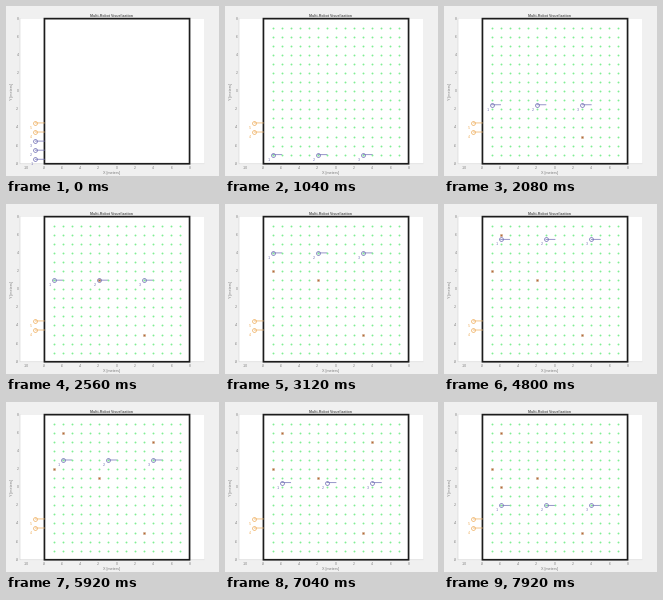
These frames come from a looping animation (213 px wide and 170 px high, 8000 ms). A matplotlib script:

```python
import matplotlib.pyplot as plt
import numpy as np
from matplotlib.animation import FuncAnimation
from matplotlib.patches import Rectangle

W, H, DPI = 213, 170, 100
STEP_MS, N_FRAMES = 80, 100
PX = 72 / DPI          # points per pixel
UNIT = 9.07            # pixels per meter
CX, CY = 111, 85.2
NAVY, ORANGE = "#7674b8", "#f0b468"
FONT = "Liberation Sans"

SWEEP_START = 1040
COLUMNS = [-7, -2, 3]
OBJECTS = [(3, -5), (-2, 1), (-7, 2), (-6, 6), (4, 5), (-6, 0)]


def to_px(x, y):
    return CX + UNIT * x, CY - UNIT * y


def half_step(v):
    return round(2 * v) / 2


def sweep(t):
    """Column shift and height: up one column, then down the next."""
    shift = np.interp(t, [3920, 4080], [0, 1])
    height = np.interp(t, [1040, 3120, 3680, 4320, 4800, 4960, 7040, 7920],
                       [-7, 4, 7, 7, 5.5, 5.5, .5, -2])
    return half_step(shift), half_step(height)


def is_found(x, y, t):
    if t < SWEEP_START:
        return False
    shift, height = sweep(t)
    if x in COLUMNS:
        return shift > 0 or height >= y
    return shift == 1 and height < y


def robot_pose(i, t):
    home = np.array([-9, i - 7.5])
    if i >= len(COLUMNS):
        return home
    if t < SWEEP_START:
        share = min(t / 700, .8)
        return home + share * (np.array([COLUMNS[i], -7]) - home)
    shift, height = sweep(t)
    return COLUMNS[i] + shift, height


fig = plt.figure(figsize=(W / DPI, H / DPI), dpi=DPI, facecolor="#f0f0f0")
ax = fig.add_axes([0, 0, 1, 1])
ax.set(xlim=(0, W), ylim=(H, 0))
ax.axis("off")


def text(x, y, s, size=3.5, color="#808080", **kw):
    kw = {"ha": "center", "va": "center", **kw}
    return ax.text(x, y, s, fontsize=size * PX, color=color, family=FONT, **kw)


def line(xs=(), ys=(), style="-", **kw):
    return ax.plot(xs, ys, style, snap=False, **kw)[0]


def draw_stage():
    left, right = 14, 198
    x0, top = to_px(-8, 8)
    x1, bottom = to_px(8, -8)
    ax.add_patch(Rectangle((left, top), right - left, bottom - top,
                           fc="white", ec="none"))
    line([left, left, right], [top, bottom, bottom], color="#d4d4d4", lw=.6 * PX)
    ax.add_patch(Rectangle((x0, top), x1 - x0, bottom - top, fc="white",
                           ec="#1c1c1c", lw=1.7 * PX, joinstyle="miter",
                           snap=False, zorder=2))
    for v in range(-10, 9, 2):
        x, y = to_px(v, v)
        text(x, 162, str(v))
        if v >= -8:
            text(12.5, y, str(v), ha="right")
    text(106, 9.9, "Multi-Robot Visualization", 3.6, "#606060", weight="bold")
    text(106, 166.7, "X [meters]", 3.8)
    text(6, 85, "Y [meters]", 3.8, rotation=90)


class Robot:
    def __init__(self, name, color):
        self.heading = line(color=color, lw=.75 * PX, zorder=4)
        self.body = line(style="o", ms=3.8 * PX, mfc="none", mec=color,
                         mew=.75 * PX, zorder=4)
        self.label = text(0, 0, name, 3.8, color, zorder=4)

    def place(self, x, y):
        px, py = to_px(x, y)
        self.body.set_data([px], [py])
        self.heading.set_data([px, px + UNIT], [py, py])
        self.label.set_position((px - 4, py + 5))


draw_stage()
cells = [to_px(x, y) for x in range(-7, 8) for y in range(-7, 8)]
dots = line(*zip(*cells), "o", ms=1.9 * PX, color="#80ee94", mew=0, zorder=5)
marks = line(style="x", ms=1.9 * PX, mew=.9 * PX, color="#c65a38", zorder=6)
robots = [Robot(str(i + 1), NAVY if i < len(COLUMNS) else ORANGE)
          for i in range(5)]


def draw(frame):
    t = frame * STEP_MS
    dots.set_visible(t >= SWEEP_START)
    for i, robot in enumerate(robots):
        robot.place(*robot_pose(i, t))
    seen = [to_px(x, y) for x, y in OBJECTS if is_found(x, y, t)]
    marks.set_data([x for x, _ in seen], [y for _, y in seen])
    return []


anim = FuncAnimation(fig, draw, frames=N_FRAMES, interval=STEP_MS,
                     repeat=True, repeat_delay=0, blit=False)
plt.show()
```
